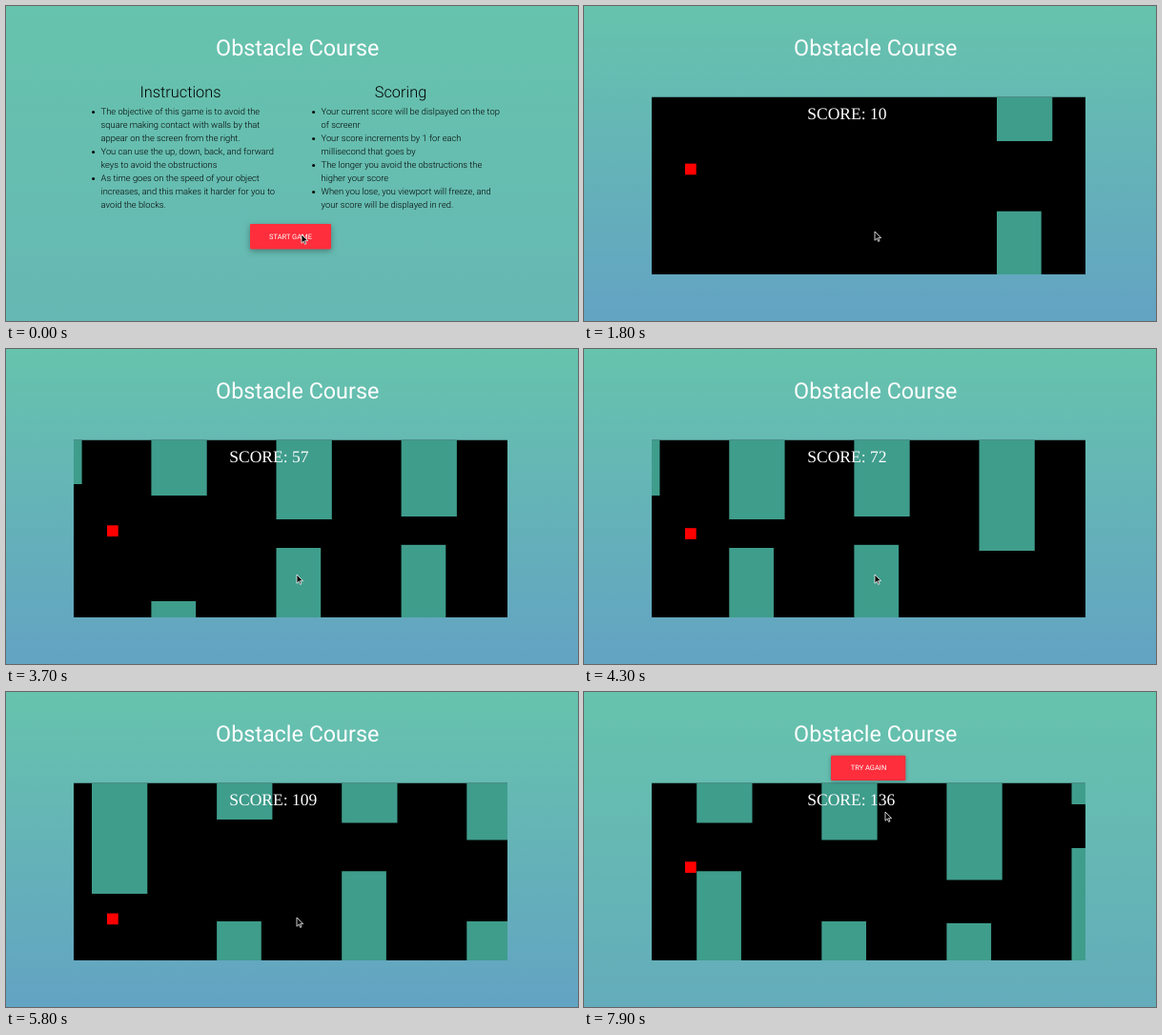
Animation, 600 px wide and 331 px high, one loop 8 s. Source, as an HTML page:

```html
<!DOCTYPE html>
<html lang="en">
<head>
<meta charset="utf-8">
<title>Obstacle Course</title>
<style>
  html, body { margin: 0; height: 100%; overflow: hidden; background: #66c3ac; }
  svg { display: block; width: 600px; height: 331px; }
  text { font-family: Roboto, sans-serif; text-rendering: geometricPrecision; }
  .mid { text-anchor: middle; }
  .title { font-size: 23.33px; fill: #fff; }
  .head { font-size: 16.33px; font-weight: 300; }
  .item { font-size: 9.33px; font-weight: 300; }
  .score { font: 17.5px "Liberation Serif", serif; fill: #fff; }
  .btn rect { fill: #fe2e3c; }
  .btn text { font-size: 7.5px; fill: #fff; }
  #start rect { filter: drop-shadow(0 2.5px 3px rgba(0, 0, 0, .32)); }
  #again rect { filter: drop-shadow(0 1.2px 2px rgba(0, 0, 0, .28)); }
</style>
</head>
<body>
<svg viewBox="0 0 600 331">
  <defs>
    <linearGradient id="sky" x2="0" y2="1">
      <stop stop-color="#66c3ac"/>
      <stop id="skyEnd" offset="1" stop-color="#66b8b4"/>
    </linearGradient>
    <clipPath id="field"><rect x="71" y="95.7" width="455" height="186.3"/></clipPath>
  </defs>
  <rect width="600" height="331" fill="url(#sky)"/>
  <text class="title mid" x="305.7" y="52">Obstacle Course</text>

  <g id="menu">
    <text class="head mid" x="183" y="96">Instructions</text>
    <text class="head mid" x="414" y="96">Scoring</text>
    <g id="lists"></g>
    <g id="start" class="btn">
      <rect x="256" y="229" width="85" height="26.5" rx="1"/>
      <text class="mid" x="298.5" y="245">START GAME</text>
    </g>
  </g>

  <g id="game">
    <g clip-path="url(#field)">
      <rect x="71" y="95" width="455" height="188"/>
      <g id="walls" fill="#3f9d8c"></g>
      <rect id="player" x="106" width="11.7" height="11.7" fill="#f00"/>
    </g>
    <text id="score" class="score" x="234.3" y="119"></text>
    <g id="again" class="btn">
      <rect x="259" y="66.7" width="78.3" height="26.3" rx="1"/>
      <text class="mid" x="298.5" y="82.3">TRY AGAIN</text>
    </g>
  </g>

  <path id="cursor" d="M0 0V9.3L2.2 7.2 3.6 10.4 5 9.8 3.6 6.7H6.6Z" stroke="#fff" stroke-width=".8"/>
</svg>

<script>
const LOOP = 8000, STEP = 100, START = 1400, OVER = 6900;
const TOP = 95.7, FLOOR = 282, GAP = 131.1;
const $ = id => document.getElementById(id);

function add(parent, tag, attrs, text) {
  const el = document.createElementNS('http://www.w3.org/2000/svg', tag);
  for (const k in attrs) el.setAttribute(k, attrs[k]);
  if (text) el.textContent = text;
  return parent.appendChild(el);
}

// Lines starting with "*" open a new bullet.
function list(x, lines) {
  lines.forEach((line, i) => {
    const y = 114.4 + i * 14;
    if (line[0] === '*') add($('lists'), 'circle', { cx: x - 8, cy: y - 3, r: 1.5 });
    add($('lists'), 'text', { class: 'item', x, y }, line.replace('*', ''));
  });
}
list(99.6, [
  '*The objective of this game is to avoid the',
  'square making contact with walls by that',
  'appear on the screen from the right.',
  '*You can use the up, down, back, and forward',
  'keys to avoid the obstructions',
  '*As time goes on the speed of your object',
  'increases, and this makes it harder for you to',
  'avoid the blocks.'
]);
list(330.6, [
  '*Your current score will be dislpayed on the top',
  'of screenr',
  '*Your score increments by 1 for each',
  'millisecond that goes by',
  '*The longer you avoid the obstructions the',
  'higher your score',
  '*When you lose, you viewport will freeze, and',
  'your score will be displayed in red.'
]);

// Opening of each wall: [upper edge, lower edge]
const walls = [
  [142, 215.7], [154, 265], [179, 209], [176, 205.8], [212, FLOOR],
  [134, 241], [137.5, 188.3], [155.5, 241], [197.5, 243], [118, 164]
].map(([a, b]) => {
  const g = add($('walls'), 'g', {});
  add(g, 'rect', { y: TOP, width: 58.3, height: a - TOP });
  add(g, 'rect', { y: b, width: 46.7, height: FLOOR - b });
  return g;
});

// Keys are [time, value] pairs joined by straight lines.
function track(keys, t) {
  if (t <= keys[0][0]) return keys[0][1];
  for (let i = 1; i < keys.length; i++) {
    const [t0, v0] = keys[i - 1], [t1, v1] = keys[i];
    if (t <= t1) return v0 + (v1 - v0) * (t - t0) / (t1 - t0);
  }
  return keys[keys.length - 1][1];
}

const firstWall = [[1400, 520], [1800, 433], [3000, 174.3], [3700, 21.3],
  [4800, -219.3], [5800, -434.4], [6880, -668.4]];
const score = [[1400, 0], [1800, 10], [3000, 40], [3700, 57], [4800, 85], [5800, 109], [6880, 136]];
const playerY = [[3430, 165.6], [3740, 188.2], [5200, 188.2], [5330, 194], [5750, 232.6],
  [6100, 232.6], [6880, 178.3]];
const cursorX = [[300, 310], [800, 305], [7700, 305], [7900, 316]];
const cursorY = [[300, 240], [800, 237], [7700, 237], [7900, 126]];

const show = (id, on) => $(id).setAttribute('display', on ? 'inline' : 'none');

function draw() {
  const t = Math.floor(performance.now() % LOOP / STEP) * STEP;
  const playing = t >= START, over = t >= OVER;
  show('menu', !playing);
  show('game', playing);
  show('again', over);
  $('skyEnd').setAttribute('stop-color', over ? '#64acbb' : playing ? '#63a3c3' : '#66b8b4');

  const x = track(firstWall, t);
  walls.forEach((g, i) => g.setAttribute('transform', `translate(${x + i * GAP} 0)`));
  $('player').setAttribute('y', track(playerY, t));
  $('score').textContent = 'SCORE: ' + Math.round(track(score, t));
  $('cursor').setAttribute('transform', `translate(${track(cursorX, t)} ${track(cursorY, t)})`);
  requestAnimationFrame(draw);
}
draw();
</script>
</body>
</html>
```
